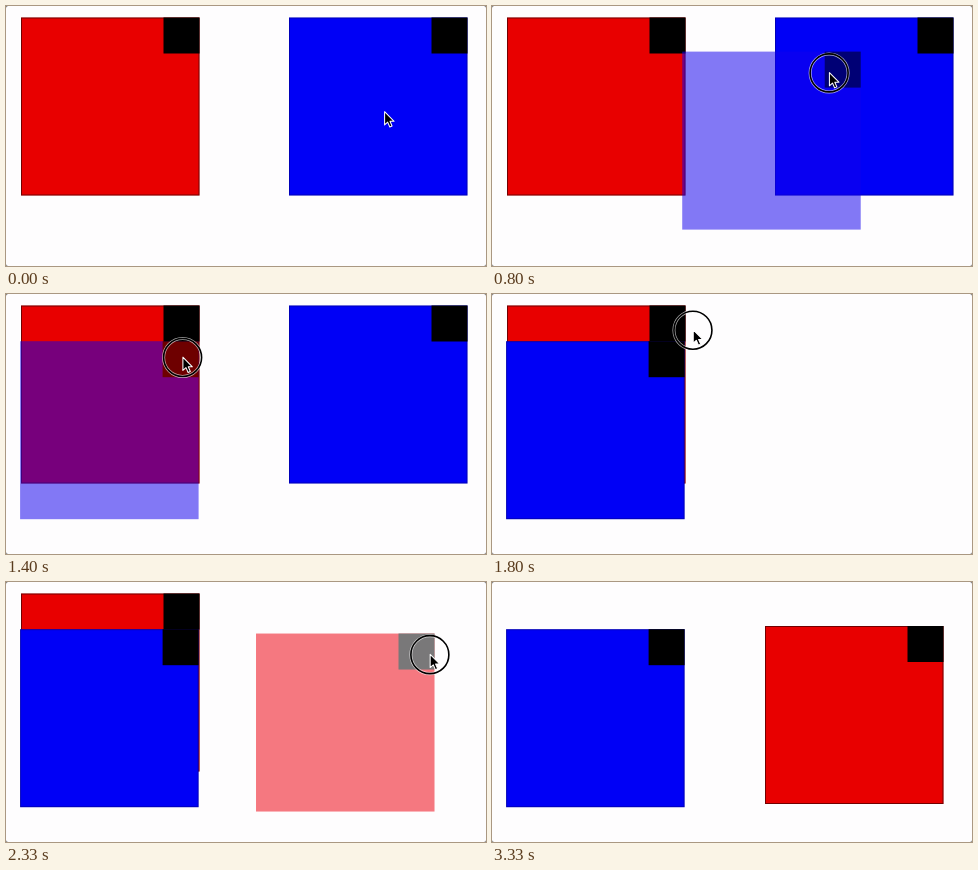
Write an HTML page that moves like this. It is 480x260 px and loops after 3.39 s.

```html
<!DOCTYPE html>
<html lang="en">
<head>
<meta charset="utf-8">
<title>Drag two boxes</title>
<style>
html, body { margin: 0; width: 100%; height: 100%; overflow: hidden; background: #777; }
svg { display: block; width: 480px; height: 260px; }
</style>
</head>
<body>
<svg viewBox="0 0 480 260">
  <defs>
    <g id="shape">
      <rect width="178.5" height="178"/>
      <rect x="142.5" width="36" height="36" fill="#000"/>
    </g>
    <rect id="edge" x=".5" y=".5" width="177.5" height="177" fill="none" stroke="#000"/>
  </defs>
  <rect width="480" height="260" rx="2.5" fill="#fefdfe"/>
  <g id="red" fill="#e80000"><use href="#shape"/><use href="#edge" opacity=".5"/></g>
  <g id="blue" fill="#0000f6"><use href="#shape"/><use href="#edge" opacity=".25"/></g>
  <g id="ghost" opacity=".52"><use href="#shape"/></g>
  <g id="pointer">
    <g id="ring" fill="none" transform="translate(.3 1.5)">
      <circle r="19" stroke="#fff" stroke-opacity=".65" stroke-width="3"/>
      <circle r="19" stroke="#000" stroke-width="1.6"/>
    </g>
    <path transform="translate(.6 1.2) scale(.93)" d="M0 0V14.2L3.3 11.2L5.6 16.4L8 15.3L5.8 10.3H10.2Z"
          fill="#000" stroke="#fff" stroke-width="1.1" stroke-linejoin="round"/>
  </g>
</svg>
<script>
const LOOP = 3390, FPS = 15, LAG = 26;
const START = { x: 378, y: 104.5 };

// pointer moves, each carrying on from the last; sag bows the line downwards
const legs = [
  { at: 40, ms: 430, x: 445, y: 27, sag: 0 },
  { at: 628, ms: 652, x: 176.3, y: 62, sag: 33 },
  { at: 1530, ms: 160, x: 183, y: 30.5, sag: 0 },
  { at: 1768, ms: 735, x: 441, y: 64, sag: 14 },
  { at: 2690, ms: 560, x: 427, y: 270, sag: 0 }
];

const boxes = [
  { id: 'blue', x: 283, y: 11.5, press: 530, drop: 1530, grab: { x: 162.2, y: 14.8 }, tint: '#1200ee' },
  { id: 'red', x: 15, y: 11.5, press: 1730, drop: 2530, grab: { x: 168, y: 20 }, tint: '#ee000e' }
];
const GHOST_DELAY = 130;

const el = id => document.getElementById(id);
const move = (id, p) => el(id).setAttribute('transform', `translate(${p.x} ${p.y})`);
const show = (id, on) => el(id).setAttribute('visibility', on ? 'visible' : 'hidden');

function pointer(t) {
  let { x, y } = START;
  for (const leg of legs) {
    const u = Math.min(1, Math.max(0, (t - leg.at) / leg.ms));
    const ease = Math.sin(u * Math.PI / 2);
    x += (leg.x - x) * ease;
    y += (leg.y - y) * ease + leg.sag * Math.sin(u * Math.PI);
  }
  return { x, y };
}

function held(box, t) {
  const p = pointer(t - LAG);
  return { x: p.x - box.grab.x, y: p.y - box.grab.y };
}

// 15 pictures a second, on 10 ms ticks
function snap(t) {
  const start = k => Math.round(k * 100 / FPS) * 10;
  const k = Math.round(t * FPS / 1000);
  return start(start(k) > t ? k - 1 : k);
}

function draw(time) {
  const t = snap(time % LOOP);
  const active = boxes.find(b => t >= b.press && t < b.drop);
  const ghost = active && t >= active.press + GHOST_DELAY;

  for (const b of boxes) move(b.id, t < b.drop ? b : held(b, b.drop));
  if (ghost) {
    move('ghost', held(active, t));
    el('ghost').setAttribute('fill', active.tint);
  }
  show('ghost', ghost);
  show('ring', active);
  move('pointer', pointer(t));
}

let origin;
function tick(now) {
  origin ??= now;
  draw(Math.max(0, now - origin));
  requestAnimationFrame(tick);
}
draw(0);
requestAnimationFrame(tick);
</script>
</body>
</html>
```
